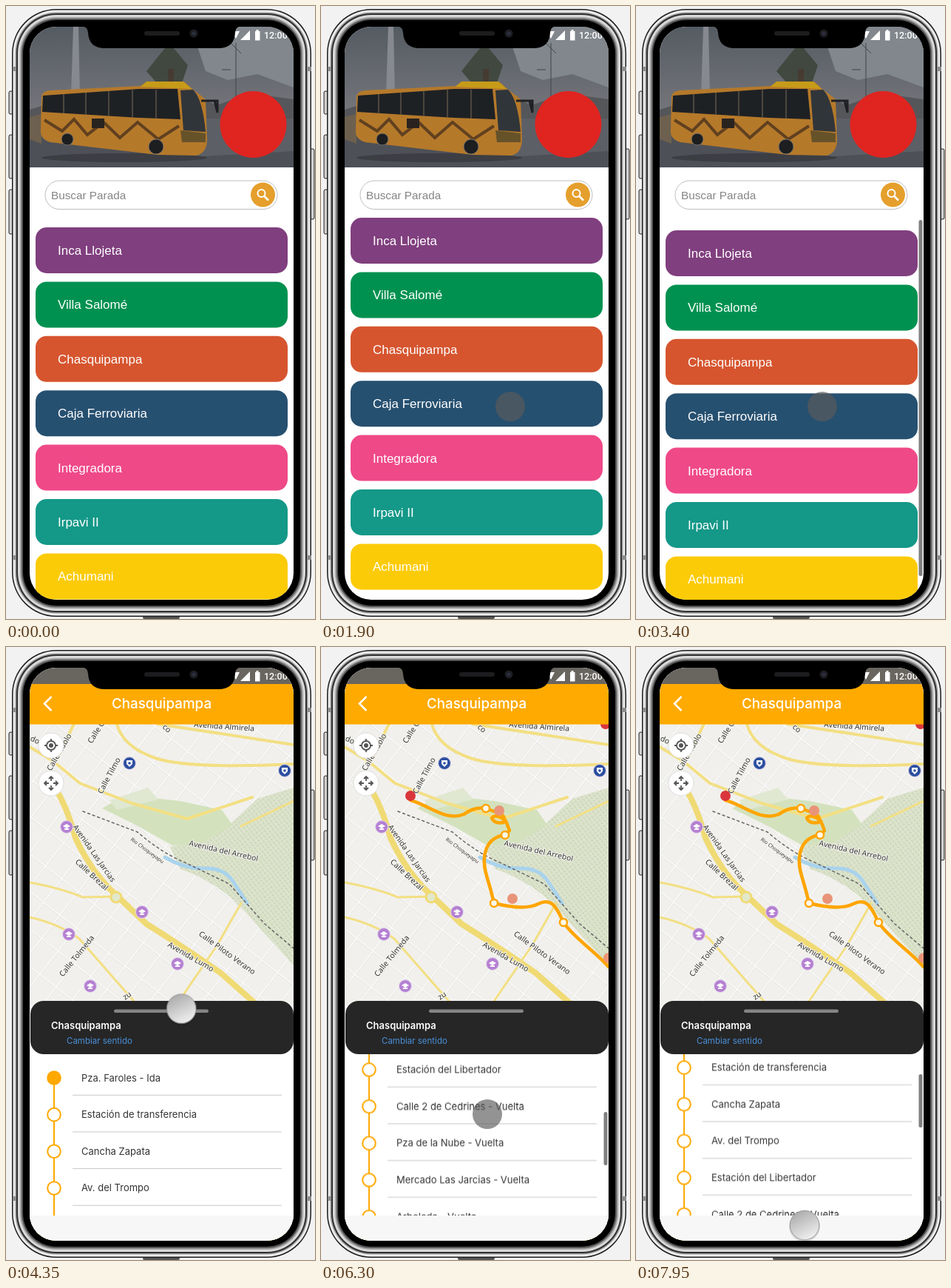
Write an HTML page that moves like this. It is 418x828 px and loops after 8 s.

```html
<!DOCTYPE html>
<html lang="es">
<head>
<meta charset="utf-8">
<title>Paradas de bus</title>
<style>
html, body { margin: 0; width: 100%; height: 100%; overflow: hidden; background: #f2f2f2; }
svg { display: block; width: 418px; height: 828px; }
text { white-space: pre; }
.arial { font-family: "Liberation Sans", Arial, sans-serif; }
.inter { font-family: Inter, sans-serif; }
.streets { font: 10.4px "Noto Sans", sans-serif; fill: #333; stroke: #f7f6f1; stroke-width: 2px; paint-order: stroke; }
.line { fill: none; stroke-linecap: round; stroke-linejoin: round; }
.anim { animation: 8s linear infinite; }

#routes { animation-name: routes; }
#routeBar { animation-name: routeBar, routeBarShow; }
#mapScreen { animation-name: push; }
#track { animation-name: track; }
#stops { animation-name: stops; }
#stopBar { animation-name: stopBar, stopBarShow; }
#touch { animation-name: touch, touchShow; }
#press { animation-name: press; }
#idle { animation-name: idle; }

@keyframes routes {
  0%, .7% { transform: translateY(-4px); animation-timing-function: ease-out; }
  8%, 24% { transform: translateY(-17px); animation-timing-function: ease-in-out; }
  31.5%, 34% { transform: translateY(-34px); animation-timing-function: ease-in-out; }
  41.5%, 100% { transform: none; }
}
@keyframes routeBar {
  0%, 24% { transform: translateY(38px); animation-timing-function: ease-in-out; }
  31.5%, 34% { transform: translateY(77px); animation-timing-function: ease-in-out; }
  41.5%, 100% { transform: none; }
}
@keyframes routeBarShow {
  0%, 23.8% { opacity: 0; }
  26%, 43% { opacity: 1; }
  46%, 100% { opacity: 0; }
}
@keyframes push {
  0%, 47.5% { transform: translateX(360px); animation-timing-function: ease-out; }
  51.5%, 100% { transform: none; }
}
@keyframes track {
  0%, 55.5% { opacity: 0; }
  57.5%, 100% { opacity: 1; }
}
@keyframes stops {
  0%, 68.75% { transform: none; }
  72.5% { transform: translateY(-123px); animation-timing-function: ease-out; }
  77.5%, 78.75% { transform: translateY(-209.6px); animation-timing-function: ease-in-out; }
  85%, 91.25% { transform: translateY(-255px); animation-timing-function: ease-in-out; }
  99.2%, 100% { transform: translateY(-63.6px); }
}
@keyframes stopBar {
  0%, 68.75% { transform: none; }
  72.5% { transform: translateY(43px); animation-timing-function: ease-out; }
  77.5%, 78.75% { transform: translateY(73px); animation-timing-function: ease-in-out; }
  85%, 91.25% { transform: translateY(89px); animation-timing-function: ease-in-out; }
  99.2%, 100% { transform: translateY(22px); }
}
@keyframes stopBarShow {
  0%, 68.75% { opacity: 0; }
  70.5%, 100% { opacity: 1; }
}
@keyframes touch {
  0%, 24% { transform: translate(256px, 541px); animation-timing-function: ease-in-out; }
  31.5%, 34% { transform: translate(261px, 528px); animation-timing-function: ease-in-out; }
  41.5%, 43% { transform: translate(252px, 541px); animation-timing-function: ease-in-out; }
  45.5%, 53% { transform: translate(238px, 482px); animation-timing-function: ease-in-out; }
  63.5% { transform: translate(218px, 672px); }
  67.5%, 68.75% { transform: translate(218px, 693px); }
  72.5% { transform: translate(222px, 570px); }
  77.5%, 78.75% { transform: translate(225px, 631px); animation-timing-function: ease-in-out; }
  85%, 91.25% { transform: translate(225px, 585px); animation-timing-function: ease-in-out; }
  99.2%, 100% { transform: translate(228px, 781px); }
}
@keyframes touchShow {
  0%, 18% { opacity: 0; }
  20%, 100% { opacity: 1; }
}
@keyframes press {
  0%, 43% { opacity: 1; }
  43.5%, 45% { opacity: 0; }
  45.5%, 47% { opacity: 1; }
  47.5%, 68.4% { opacity: 0; }
  69%, 98.5% { opacity: 1; }
  99.2%, 100% { opacity: 0; }
}
@keyframes idle {
  0%, 43% { opacity: 0; }
  43.5%, 45% { opacity: 1; }
  45.5%, 47% { opacity: 0; }
  47.5%, 68.4% { opacity: 1; }
  69%, 98.5% { opacity: 0; }
  99.2%, 100% { opacity: 1; }
}
</style>
</head>
<body>
<svg viewBox="0 0 418 828">
  <defs>
    <clipPath id="screenClip"><rect x="32" y="28" width="357" height="774" rx="36"/></clipPath>
    <clipPath id="routeClip"><rect x="32" y="285" width="357" height="517"/></clipPath>
    <clipPath id="mapClip"><rect x="32" y="104" width="357" height="380"/></clipPath>
    <clipPath id="stopClip"><rect x="32" y="540" width="357" height="228"/></clipPath>
    <linearGradient id="sky" x2="0" y2="1">
      <stop stop-color="#555b62"/><stop offset=".6" stop-color="#74757b"/><stop offset="1" stop-color="#5c5e64"/>
    </linearGradient>
    <linearGradient id="knob" x2=".5" y2="1">
      <stop stop-color="#a2a2a2"/><stop offset="1" stop-color="#ececec"/>
    </linearGradient>
    <pattern id="blocks" width="28" height="40" patternUnits="userSpaceOnUse" patternTransform="rotate(38)">
      <rect width="28" height="40" fill="#f1f0ec"/>
      <path d="M0 0H28M0 0V40" stroke="#dedddb" stroke-width="4"/>
      <path d="M0 0H28M0 0V40" stroke="#fff" stroke-width="2.6"/>
    </pattern>
    <pattern id="woods" width="5" height="5" patternUnits="userSpaceOnUse" patternTransform="rotate(52)">
      <rect width="5" height="5" fill="#dce3cb"/><path d="M0 2H3" stroke="#bfc9ad"/>
    </pattern>
  </defs>

  <g id="body"></g>

  <g clip-path="url(#screenClip)">
    <rect x="32" y="28" width="357" height="774" fill="#fff"/>

    <g id="photo">
      <rect x="32" y="28" width="357" height="190" fill="url(#sky)"/>
      <path d="M250 28H389V110L340 92L300 100L270 88Z" fill="#81878c"/>
      <path d="M32 140L70 128L120 118H250L285 134L330 118L389 126V165H32Z" fill="#55565a"/>
      <path d="M32 152H389V218H32Z" fill="#5d5f66"/>
      <path d="M32 172L230 205L389 196V218H32Z" fill="#4d5057"/>
      <path d="M32 150L48 146V186L32 180Z" fill="#6d604e"/>
      <path d="M91 28H98L100 120H88Z" fill="#868990"/>
      <path d="M311 50V140M292 86H304M282 28L318 64" stroke="#41454a" fill="none"/>
      <path d="M221 50L246 80L238 104H204L190 88L206 68Z" fill="#41483f"/>
      <path d="M219 85H227V115H219Z" fill="#463b32"/>
      <ellipse cx="160" cy="205" rx="112" ry="6" fill="#3c3e43"/>
      <path d="M48 121Q50 115 60 114L182 108L190 103H242L252 112L270 126L272 180Q272 198 258 202L205 201L60 184Q46 180 47 168Z" fill="#b5792a"/>
      <path d="M182 109L190 102H240L251 112Z" fill="#c69b19"/>
      <path d="M50 121L180 112H232L236 153L180 151L49 143Z" fill="#1e2124"/>
      <path d="M236 114L253 113Q266 126 270 170L240 168Z" fill="#30353a"/>
      <path d="M78 119V145M108 117V147M139 115V149M171 113V150M203 113V152" stroke="#5b5447" stroke-width="1.5"/>
      <path d="M52 154L76 169L92 153L110 174L132 157L154 178L178 157L206 180L234 162" fill="none" stroke="#60401f" stroke-width="4"/>
      <path d="M116 152H133V165H116Z" fill="#29231f"/>
      <path d="M236 168L270 172L270 184H238Z" fill="#665229"/>
      <g fill="#1d1e20" stroke="#76726a"><circle cx="83" cy="180" r="8"/><circle cx="203" cy="190" r="10"/></g>
      <path d="M264 128H286V144L282 128" fill="none" stroke="#1e2023" stroke-width="3"/>
    </g>
    <circle cx="334.500" cy="160" r="45" fill="#e02420"/>

    <rect x="53" y="236" width="314" height="38.500" rx="19.200" fill="#fff" stroke="#bdbdbd"/>
    <text class="arial" x="61" y="261" font-size="15.300" fill="#858585">Buscar Parada</text>
    <circle cx="347.500" cy="255" r="16.500" fill="#e59f2c"/>
    <g fill="none" stroke="#fff" stroke-width="2"><circle cx="345.500" cy="253" r="5"/><path d="M349 256.500L355 262.500" stroke-width="2.600"/></g>

    <g clip-path="url(#routeClip)">
      <g id="routes" class="anim arial" font-size="17" fill="#fff"></g>
      <rect id="routeBar" class="anim" x="382.500" y="289" width="5" height="481" rx="2.500" fill="#808080"/>
    </g>

    <g id="mapScreen" class="anim">
      <rect x="32" y="28" width="357" height="774" fill="#fff"/>
      <g clip-path="url(#mapClip)">
        <rect x="32" y="104" width="357" height="380" fill="url(#blocks)"/>
        <path d="M222 270Q262 262 300 242L340 205L389 190V430L330 365Q290 318 236 300Z" fill="url(#woods)"/>
        <path d="M130 218L162 200L235 208L292 220L306 240L266 265L225 268L175 240Z" fill="#d3e2bd"/>
        <path d="M140 207L192 190L206 206L150 220Z" fill="#e0e8d1"/>
        <g class="line" stroke="#f3df83">
          <path d="M66 190Q82 214 94 258Q116 306 152 338L190 374Q235 402 290 440L340 484" stroke-width="8" stroke="#f0da74"/>
          <path d="M32 135L65 155L100 184L170 211L245 232L333 203M150 104Q158 135 202 150T389 158" stroke-width="4"/>
          <path d="M32 318Q75 326 104 338L150 337M32 365Q72 374 99 394L178 484M230 484L285 404L318 346M389 208L318 242" stroke-width="3"/>
          <path d="M92 104L64 160M205 104L389 132" stroke-width="4"/>
        </g>
        <circle cx="149" cy="338" r="7" fill="#e2e8ca" stroke="#f0da74" stroke-width="3"/>
        <path class="line" d="M215 284Q242 300 269 299T308 318L326 346" stroke="#a9d3ed" stroke-width="5"/>
        <path class="line" d="M104 222L178 250Q210 278 244 292L302 320L350 374L389 407" stroke="#666" stroke-width="1.500" stroke-dasharray="3 4"/>
        <g id="streetNames" class="streets"></g>
        <g id="places"></g>
        <g id="track" class="anim">
          <path class="line" d="M121 207C145 213 168 236 193 226C207 217 214 217 223 218L242 225Q251 230 247 237Q234 239 231 231Q237 224 250 235L255 248L249 254C223 257 216 282 224 309Q231 332 234 346C258 352 280 354 294 347C312 338 319 352 328 372C343 394 371 411 389 432" stroke="#ffa500" stroke-width="4.500"/>
          <g id="nodes" fill="#fff8e8" stroke="#ffa500" stroke-width="2.500"></g>
          <g id="pins"></g>
        </g>
        <g fill="#fff" stroke="#ddd"><circle cx="61" cy="133" r="17"/><circle cx="61" cy="184" r="17"/></g>
        <g fill="none" stroke="#555" stroke-width="1.800">
          <circle cx="61" cy="133" r="6"/><path d="M61 124V127M61 139V142M52 133H55M67 133H70"/>
          <path d="M61 175V181M61 187V193M52 184H58M64 184H70M58 178L61 175L64 178M58 190L61 193L64 190M55 181L52 184L55 187M67 181L70 184L67 187"/>
        </g>
        <circle cx="61" cy="133" r="3" fill="#555"/>
      </g>
      <rect x="32" y="28" width="357" height="23" fill="#69655f"/>
      <rect x="32" y="50" width="357" height="54.500" fill="#ffaa00"/>
      <path d="M61.500 67L52 76.500L61.500 86" fill="none" stroke="#fff" stroke-width="2.500"/>
      <text class="inter" x="210.500" y="83" text-anchor="middle" font-size="18.800" font-weight="500" fill="#fff">Chasquipampa</text>
      <rect x="32" y="532" width="357" height="236" fill="#fff"/>
      <rect x="32" y="768" width="357" height="34" fill="#f7f7f7"/>
      <g clip-path="url(#stopClip)">
        <g id="stops" class="anim inter" font-size="13" fill="#333"></g>
      </g>
      <rect id="stopBar" class="anim" x="382.500" y="555" width="5" height="72" rx="2.500" fill="#808080"/>
      <rect x="33" y="478" width="356" height="72" rx="18" fill="#262626"/>
      <rect x="146" y="489.500" width="128" height="4.500" rx="2.200" fill="#858585"/>
      <text class="inter" x="61" y="516" font-size="13" font-weight="600" fill="#fff">Chasquipampa</text>
      <text class="inter" x="82" y="536" font-size="11.500" fill="#4a90d9">Cambiar sentido</text>
    </g>

    <g fill="#fff">
      <path d="M305 34H316L311 44ZM317 46L330 33V46Z"/>
      <path d="M337 34H338.500V32H341.500V34H343.500V46.500H337Z"/>
      <text x="349" y="43.500" font-family="Roboto, sans-serif" font-size="12.500" font-weight="500">12:00</text>
    </g>
  </g>

  <path d="M102 27Q111 28 111 36Q112 57 134 57H287Q309 57 310 36Q310 28 319 27Z"/>
  <rect x="187" y="34" width="48" height="6" rx="3" fill="#1d1d1f"/>
  <circle cx="254" cy="37" r="5.500" fill="#1d1d22"/><circle cx="254" cy="37" r="2.500" fill="#2c2f40"/>

  <g id="touch" class="anim">
    <g id="idle" class="anim">
      <circle cy="1.500" r="21" fill="#000" opacity=".12"/>
      <circle r="19.800" fill="url(#knob)" stroke="#999" stroke-width="1"/>
    </g>
    <circle id="press" class="anim" r="20" fill="#5c5c5c" fill-opacity=".66"/>
  </g>
</svg>
<script>
const fill = (id, items, draw) => {
  document.getElementById(id).innerHTML = items.map(draw).join('');
};

// Nested bezel rings, from the outer edge inwards
const rings = [[8, '#1c1c1c'], [9.5, '#ededed'], [12.5, '#9a9a9a'], [14, '#303030'],
  [16, '#dadada'], [19, '#a0a0a0'], [21, '#555'], [23, '#000']];
const buttons = [[4, 115, 31], [4, 174, 59], [4, 248, 60], [412, 193, 95]];
fill('body', [
  ...buttons.map(([x, y, h]) => [x, y, 5, h, 2, '#d0d0d0" stroke="#222']),
  [185, 824, 50, 4, 2, '#555'],
  ...rings.map(([i, color]) => [i, i - 4, 421 - 2 * i, 837 - 2 * i, 68 - i, color]),
  ...[82, 742].flatMap(y => [9, 408].map(x => [x, y, 5, 6, 0, '#8c8c8c']))
], ([x, y, w, h, r, color]) => `<rect x="${x}" y="${y}" width="${w}" height="${h}" rx="${r}" fill="${color}"/>`);

fill('routes', [
  ['Inca Llojeta', '#803f7e'], ['Villa Salomé', '#009150'], ['Chasquipampa', '#d6552f'],
  ['Caja Ferroviaria', '#265070'], ['Integradora', '#ef4988'], ['Irpavi II', '#149888'], ['Achumani', '#fccb07']
], ([name, color], i) => {
  const y = 303 + i * 73.4;
  return `<rect x="40" y="${y}" width="341" height="62" rx="15" fill="${color}"/><text x="70" y="${y + 37}">${name}</text>`;
});

const stopNames = ['Pza. Faroles - Ida', 'Estación de transferencia', 'Cancha Zapata', 'Av. del Trompo',
  'Estación del Libertador', 'Calle 2 de Cedrines - Vuelta', 'Pza de la Nube - Vuelta',
  'Mercado Las Jarcias - Vuelta', 'Arboleda - Vuelta', 'Mirador - Vuelta', 'Parque - Vuelta', 'Terminal', 'Garaje'];
fill('stops', stopNames, (name, i) => {
  const y = 582 + i * 49.65;
  const line = i < stopNames.length - 1 ? `<path d="M65 ${y}v50" stroke="#ffa800" stroke-width="2"/>` : '';
  return `${line}<circle cx="65" cy="${y}" r="8.8" fill="${i ? '#fff' : '#ffa800'}" stroke="#ffa800" stroke-width="2"/>
    <text x="102" y="${y + 4.5}">${name}</text><path d="M90 ${y + 23.3}H373" stroke="#c8c8c8"/>`;
});

fill('streetNames', [
  [130, 199, -62, 'Calle Tilmo'], [61, 168, -60, 'Calle Nublo'], [116, 131, -58, 'Calle Olmar'],
  [90, 243, 55, 'Avenida Las Jarcias'], [93, 291, 43, 'Calle Brezal'], [77, 446, -51, 'Calle Tolmeda'],
  [218, 404, 30, 'Avenida Lumo'], [260, 389, 36, 'Calle Piloto Verano'], [247, 268, 13, 'Avenida del Arrebol'],
  [254, 108, 4, 'Avenida Almirela'], [32, 126, 25, 'do'], [211, 109, 40, 'co'], [161, 477, -35, 'zu'],
  [168, 261, 36, 'Rio Choqueyapu', 7]
], ([x, y, angle, name, size = 10.4]) =>
  `<text transform="translate(${x} ${y}) rotate(${angle})" style="font-size:${size}px">${name}</text>`);

const cap = '<path d="M-5-1L0-4L5-1L0 2ZM-3 2V4H3V2" fill="#fff"/>';
const shield = '<path d="M-4-4H4V1L0 5L-4 1Z" fill="#fff"/><circle r="1.8" fill="#2c4fa0"/>';
fill('places', [
  [167, 157, 1], [377, 167, 1], [82, 243], [184, 358], [85, 388], [232, 428], [114, 458]
], ([x, y, police]) => `<g transform="translate(${x} ${y})">
  <circle r="8.5" fill="${police ? '#2c4fa0' : '#b580d2'}" stroke="#e3d9ec"/>${police ? shield : cap}</g>`);

fill('nodes', [[223, 218], [249, 254], [234, 346], [328, 372]],
  ([x, y]) => `<circle cx="${x}" cy="${y}" r="5"/>`);
fill('pins', [[121, 201, '#d9363c'], [241, 221, '#e99478'], [259, 340, '#e99478'], [389, 420, '#e99478'], [385, 104, '#d9363c']],
  ([x, y, color]) => `<circle cx="${x}" cy="${y}" r="7" fill="${color}"/>`);
</script>
</body>
</html>
```
